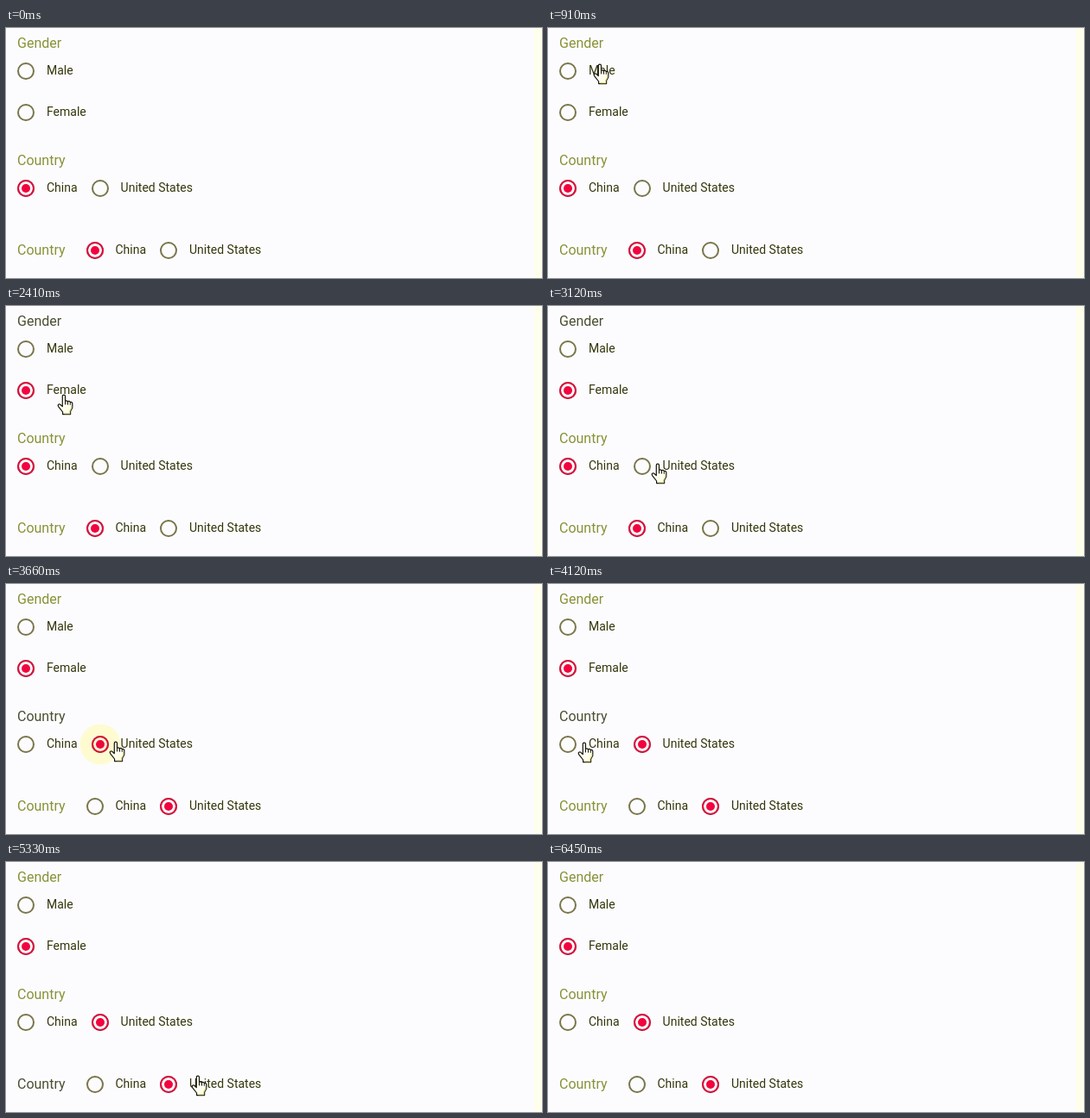
An HTML page for the animation above (6490 ms loop, 620 by 290 pixels).

```html
<!DOCTYPE html>
<html lang="en">
<head>
<meta charset="utf-8">
<title>Radio groups</title>
<style>
  @property --on { syntax: "<number>"; inherits: true; initial-value: 0; }

  html, body { margin: 0; width: 100%; height: 100%; overflow: hidden; background: #fcfcff; }
  svg { display: block; width: 620px; height: 290px; }

  text { font: 14px Roboto, Arial, sans-serif; fill: #35370a; }
  .label {
    font-size: 16px;
    fill: color-mix(in srgb, #4c5030 calc(var(--on) * 100%), #8a9236);
  }
  .ring { fill: none; stroke: #7a764a; stroke-width: 2; }
  .ring.lit { stroke: #e00b3f; opacity: var(--on); }
  .dot { fill: #f2043f; transform: scale(var(--on)); }
  .ripple { fill: #fefbd0; opacity: var(--on); transform: scale(calc(.4 + .6 * var(--on))); }

  .male, .female, .china, .us, .label, .halo, .cursor {
    animation: 6490ms linear infinite;
  }
  .male { animation-name: male; }
  .female { animation-name: female; }
  .china { animation-name: china; }
  .us { animation-name: us; }
  .gender { animation-name: gender; }
  .stacked { animation-name: stacked; }
  .inline { animation-name: inline; }
  .halo-us { animation-name: halo-us; }
  .halo-china { animation-name: halo-china; }
  .cursor { animation-name: cursor; }

  /* Selected state of each option */
  @keyframes male {
    0%, 19.88% { --on: 0; }
    23.5%, 31.43% { --on: 1; }
    35%, 100% { --on: 0; }
  }
  @keyframes female {
    0%, 31.43% { --on: 0; }
    35%, 100% { --on: 1; }
  }
  @keyframes china {
    0%, 48.07% { --on: 1; }
    52%, 66.72% { --on: 0; }
    70.5%, 77.04% { --on: 1; }
    81.2%, 100% { --on: 0; }
  }
  @keyframes us {
    0%, 48.07% { --on: 0; }
    52%, 66.72% { --on: 1; }
    70.5%, 77.04% { --on: 0; }
    81.2%, 100% { --on: 1; }
  }

  /* Focused state of each group label */
  @keyframes gender {
    0%, 19.88% { --on: 0; }
    23.5%, 48.07% { --on: 1; }
    52%, 100% { --on: 0; }
  }
  @keyframes stacked {
    0%, 48.07% { --on: 0; }
    52%, 77.04% { --on: 1; }
    81.2%, 100% { --on: 0; }
  }
  @keyframes inline {
    0%, 77.04% { --on: 0; }
    81.2%, 99.37% { --on: 1; }
    99.38%, 100% { --on: 0; }
  }

  @keyframes halo-us {
    0%, 48.07% { --on: 0; }
    51%, 58.4% { --on: 1; }
    61%, 100% { --on: 0; }
  }
  @keyframes halo-china {
    0%, 66.72% { --on: 0; }
    69.5%, 72.4% { --on: 1; }
    75%, 100% { --on: 0; }
  }

  /* Fingertip position */
  @keyframes cursor {
    0%, 5.08% { transform: translate(214px, 320px); }
    5.085% { transform: translate(214px, 249px); animation-timing-function: ease-in-out; }
    14.02% { transform: translate(60px, 42px); }
    23.73% { transform: translate(60px, 42px); animation-timing-function: ease-in-out; }
    27.58% { transform: translate(67px, 103px); }
    37.2% { transform: translate(67px, 103px); animation-timing-function: ease-in-out; }
    40.99% { transform: translate(118px, 180px); }
    44.22% { transform: translate(127px, 183px); }
    58.3% { transform: translate(127px, 183px); animation-timing-function: ease-in-out; }
    63.48% { transform: translate(42px, 184px); }
    68.57% { transform: translate(42px, 184px); animation-timing-function: ease-in; }
    71.19% { transform: translate(138px, 245px); animation-timing-function: ease-out; }
    76.27% { transform: translate(222px, 248px); }
    89.1% { transform: translate(222px, 248px); animation-timing-function: ease-in; }
    91.68%, 100% { transform: translate(225px, 320px); }
  }
</style>
</head>
<body>
<svg viewBox="0 0 620 290">
  <defs>
    <g id="radio">
      <circle class="ring" r="9"/>
      <circle class="ring lit" r="9"/>
      <circle class="dot" r="5"/>
    </g>
  </defs>

  <rect x="611" width="9" height="290" fill="#fefeec"/>

  <g transform="translate(23 186)"><g class="halo halo-china"><circle class="ripple" r="23.5"/></g></g>
  <g transform="translate(109 186)"><g class="halo halo-us"><circle class="ripple" r="23.5"/></g></g>

  <text class="label gender" x="13" y="23">Gender</text>
  <g class="male"><use href="#radio" x="23" y="50"/><text x="47" y="54">Male</text></g>
  <g class="female"><use href="#radio" x="23" y="98"/><text x="47" y="102">Female</text></g>

  <text class="label stacked" x="13" y="159">Country</text>
  <g class="china"><use href="#radio" x="23" y="186"/><text x="47" y="190">China</text></g>
  <g class="us"><use href="#radio" x="109" y="186"/><text x="132.6" y="190">United States</text></g>

  <text class="label inline" x="13" y="263">Country</text>
  <g class="china"><use href="#radio" x="103" y="258"/><text x="126.5" y="262">China</text></g>
  <g class="us"><use href="#radio" x="188" y="258"/><text x="212" y="262">United States</text></g>

  <g class="cursor">
    <path d="M-1.7 13.5V1.8a1.6 1.6 0 0 1 3.2 0V7.4q1.5-1.2 3 .4 1.6-1 2.8.7 2.4-.6 2.5 1.8V15L7.6 19v3.6H-1.4V20L-6.4 13.6q-1-2 .6-2.6 1.4-.4 2.6 1.2z"
          fill="#fffff0" stroke="#15150a" stroke-width="1.2" stroke-linejoin="round"/>
    <path d="M1.5 7.4v4M4.5 7.8v3.8M7.3 8.5v3.3" fill="none" stroke="#15150a"/>
    <path d="M8.6 13v2L6.6 18.6v3H.5" fill="none" stroke="#e8e58c" stroke-width="1.2"/>
  </g>
</svg>
</body>
</html>
```
